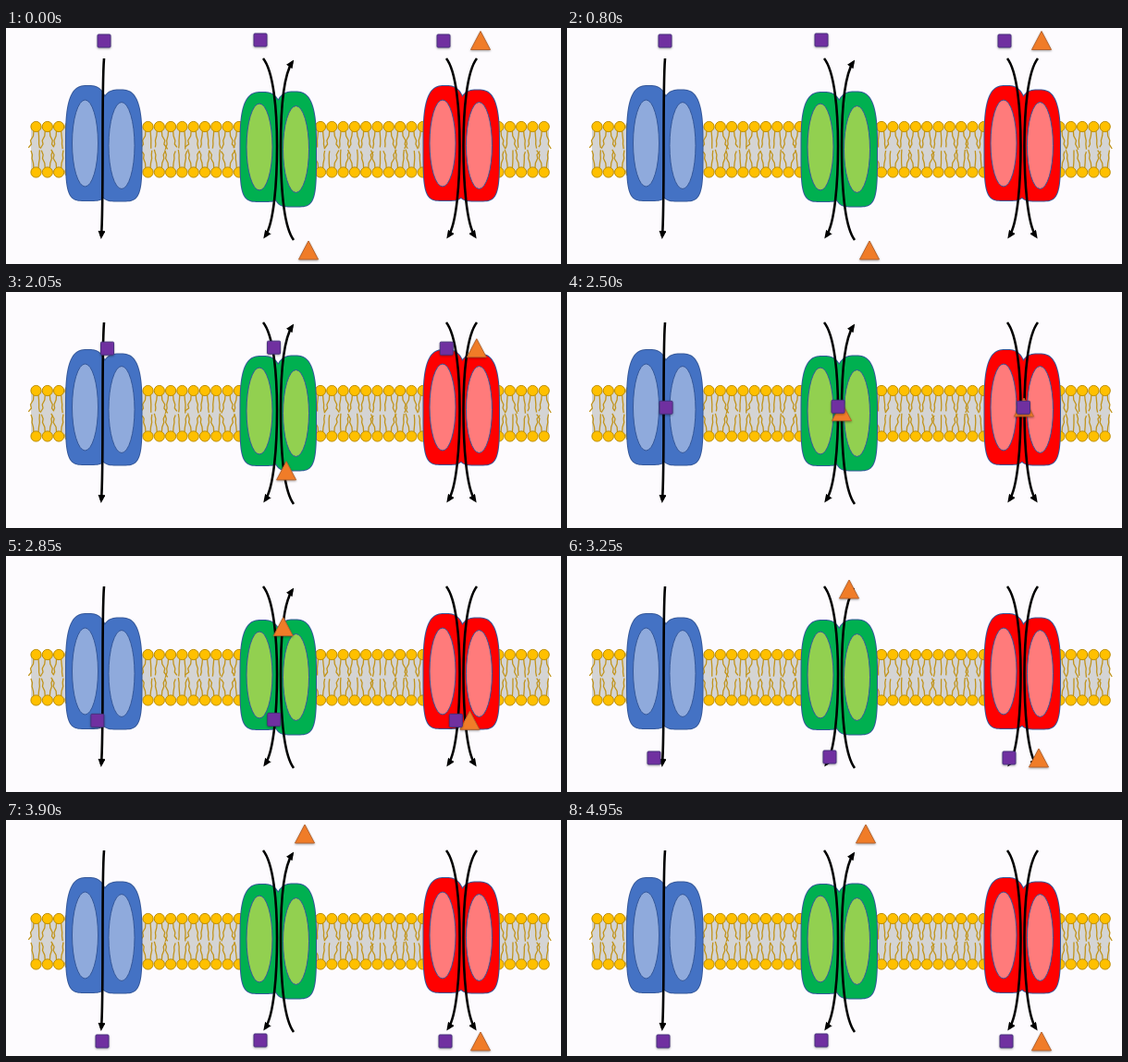
Animation, 600 px wide and 256 px high, one loop 5 s. Source, as an HTML page:

```html
<!DOCTYPE html>
<html lang="en">
<head>
<meta charset="utf-8">
<title>Membrane transport</title>
<style>
html, body { margin: 0; width: 100%; height: 100%; overflow: hidden; background: #fdfbfe; }
svg { display: block; width: 600px; height: 256px; }
.tail { fill: none; stroke: #c1941c; stroke-width: 1.3; }
.head { fill: #ffc000; stroke: #bc8c00; stroke-width: 1; }
.outline { stroke: #35589a; stroke-width: 2; }
.pocket { stroke: #35589a; stroke-width: 1; }
.arrow { fill: none; stroke: #000; stroke-width: 2.6; }
.square { fill: #7030a0; stroke: #49317f; stroke-width: 1; }
.triangle { fill: #f07c28; stroke: #b8632c; stroke-width: 1; stroke-linejoin: round; }
.particle { filter: drop-shadow(0.5px 1.5px 1px rgba(0, 0, 0, .35)); }
</style>
</head>
<body>
<svg id="stage" viewBox="0 0 600 256">
  <defs>
    <marker id="tip" viewBox="0 0 9 8" refX="6" refY="4" markerWidth="9" markerHeight="8"
      markerUnits="userSpaceOnUse" orient="auto"><path d="M0 0L9 4L0 8Z"/></marker>
  </defs>
</svg>
<script>
const LOOP = 5000, STEP = 50, START = 1210, TRAVEL = 2600;
const TOP = 107, BOTTOM = 156.5, PITCH = 12.3;
const stage = document.getElementById('stage');

function add(tag, attrs) {
  const el = document.createElementNS('http://www.w3.org/2000/svg', tag);
  for (const key in attrs) el.setAttribute(key, attrs[key]);
  return stage.appendChild(el);
}

let seed = 11;
const random = () => (seed = (seed * 16807) % 2147483647) / 2147483647;
const spread = size => (random() - .5) * size;

function lipid(x, y, dir) {
  for (const side of [-1, 1]) {
    const lean = side * 1.5 + spread(3);
    add('path', { class: 'tail', d: `M${x + side * 2.5} ${y + dir * 4}` +
      `l${side * .5} ${dir * 6}l${lean} ${dir * 5}l${-lean * .3} ${dir * 4}` +
      `l${lean + spread(2)} ${dir * (3 + random() * 3)}` });
  }
  add('circle', { class: 'head', cx: x, cy: y, r: 5.6 });
}

// Each run of lipids ends out of sight behind the next protein.
function lipids(from, to) {
  for (let x = from; x < to; x += PITCH) {
    lipid(x, TOP, 1);
    lipid(x, BOTTOM, -1);
  }
}

// Superellipse with a squarer lower half
function lobe(cx, cy, rx, ry) {
  let d = '';
  for (let i = 0; i < 120; i++) {
    const a = i * Math.PI / 60, c = Math.cos(a), s = Math.sin(a);
    const n = s < 0 ? 3 : 4.5;
    const x = cx + rx * Math.sign(c) * Math.abs(c) ** (2 / n);
    const y = cy + ry * Math.sign(s) * Math.abs(s) ** (2 / n);
    d += `${i ? 'L' : 'M'}${x.toFixed(2)} ${y.toFixed(2)}`;
  }
  return d + 'Z';
}

// Two overlapping lobes, the right one a little lower
function protein(x, y, leftRy, rightRy, fill, light) {
  const d = lobe(x + 23.5, y, 23.5, leftRy) + lobe(x + 58, y + 2.5, 23.5, rightRy);
  add('path', { class: 'outline', fill, d });
  add('path', { fill, d });
  for (const [dx, dy] of [[20.5, 0], [60, 2.5]])
    add('ellipse', { class: 'pocket', fill: light, cx: x + dx, cy: y + dy, rx: 14, ry: 47 });
}

function arrow(from, mid, to, y0 = 33, y1 = 226) {
  const bend = 14 * Math.sign(y1 - y0), ease = x => x + (mid - x) * .75;
  add('path', { class: 'arrow', 'marker-end': 'url(#tip)',
    d: `M${from} ${y0}C${ease(from)} ${y0 + bend} ${mid} ${y0 + 4 * bend} ${mid} 128` +
       `S${ease(to)} ${y1 - bend} ${to} ${y1}` });
}

add('rect', { x: 27, y: TOP, width: 560, height: BOTTOM - TOP, fill: '#d4d4d4' });
lipids(32.5, 106);
lipids(153.5, 294);
lipids(340, 492);
lipids(532.5, 587);

protein(65, 125, 62, 60, '#4472c4', '#8faadc');
protein(253.5, 129, 59, 62, '#00b050', '#92d050');
protein(451.5, 125, 62, 60, '#ff0000', '#ff7b7b');

arrow(106, 104.5, 103);
arrow(278, 293, 280);
arrow(311, 297, 309.5, 230, 37);
arrow(476, 490.5, 478);
arrow(509, 494.5, 507);

// Sideways waypoints at shared fractions of a steady vertical journey
const shares = [0, .045, .5, .907, 1];
const shapes = {
  square: 'M-6 -7H6Q7 -7 7 -6V6Q7 7 6 7H-6Q-7 7 -7 6V-6Q-7 -7 -6 -7Z',
  triangle: 'M0 -10L10.5 10H-10.5Z'
};

function particle(kind, from, to, xs) {
  const el = add('path', { class: kind + ' particle', d: shapes[kind] });
  const x = curve(xs);
  return p => el.setAttribute('transform',
    `translate(${x(p).toFixed(2)} ${(from + (to - from) * p).toFixed(2)})`);
}

// Monotone cubic through the waypoints
function curve(values) {
  const gaps = shares.slice(1).map((s, i) => s - shares[i]);
  const rise = gaps.map((g, i) => (values[i + 1] - values[i]) / g);
  const slope = values.map((_, i) => {
    const a = rise[i - 1] ?? rise[i], b = rise[i] ?? a;
    return a * b > 0 ? 2 * a * b / (a + b) : 0;
  });
  return p => {
    let i = 0;
    while (i < gaps.length - 1 && p > shares[i + 1]) i++;
    const u = (p - shares[i]) / gaps[i], v = 1 - u;
    return values[i] * v * v * (1 + 2 * u) + values[i + 1] * u * u * (3 - 2 * u) +
      gaps[i] * u * v * (slope[i] * v - slope[i + 1] * u);
  };
}

const particles = [
  particle('square', 14, 240, [106, 110, 107, 94, 104]),
  particle('triangle', 241, 15, [327, 311, 297, 305, 323]),
  particle('square', 13, 239, [275, 285, 293, 284, 275]),
  particle('triangle', 13.5, 240, [513, 515, 494, 510, 513]),
  particle('square', 14, 240, [473, 469, 493.5, 478, 475])
];

function draw(ms) {
  const t = Math.floor(ms % LOOP / STEP) * STEP;
  const u = Math.min(1, Math.max(0, (t - START) / TRAVEL));
  const p = u < .5 ? 2 * u * u : 1 - 2 * (1 - u) ** 2;
  for (const place of particles) place(p);
}

let origin;
function tick(now) {
  origin ??= now;
  draw(now - origin);
  requestAnimationFrame(tick);
}
draw(0);
requestAnimationFrame(tick);
</script>
</body>
</html>
```
